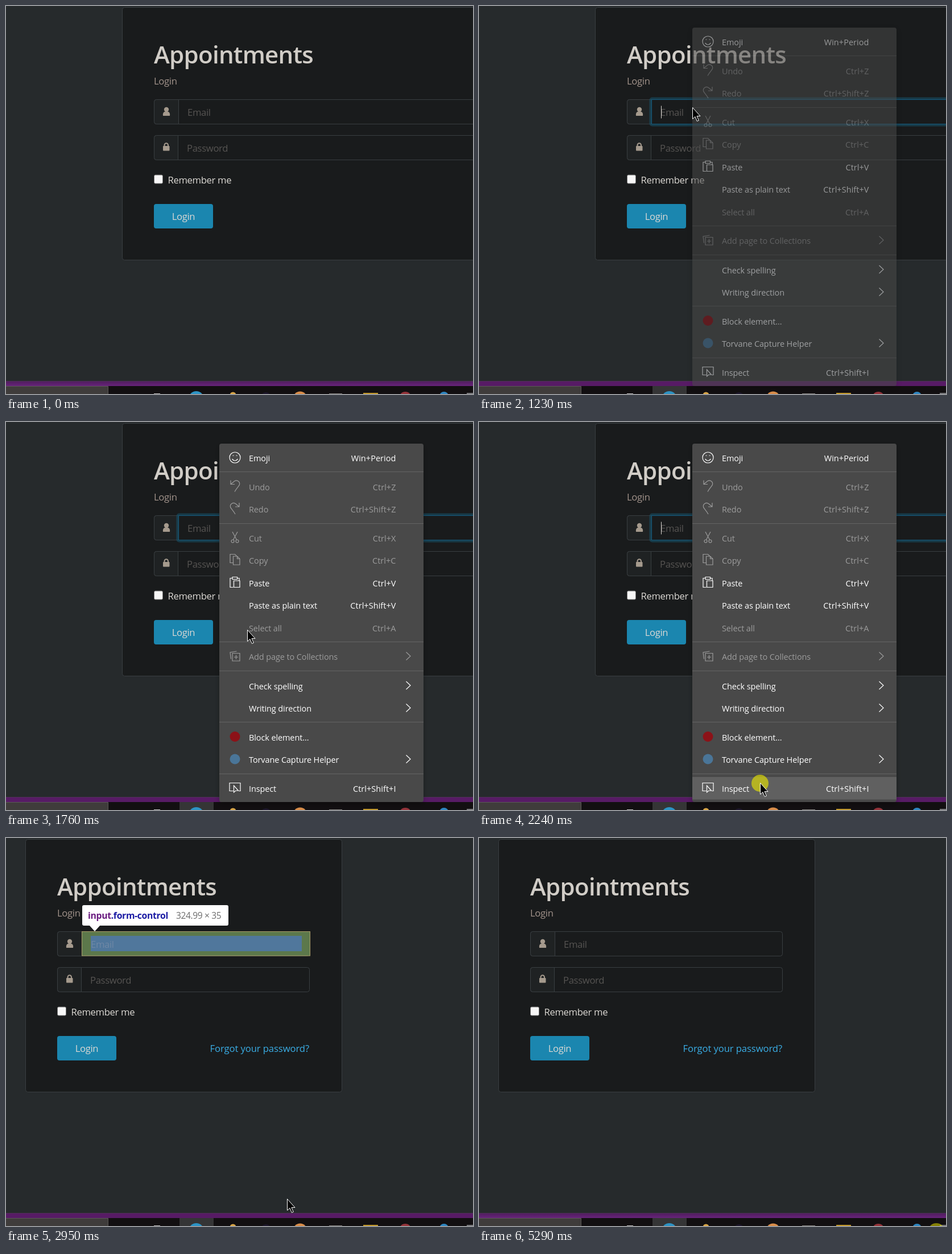
An HTML page that plays this animation: 821 by 682 pixels, repeating every 5360 ms.

```html
<!DOCTYPE html>
<html lang="en">
<head>
<meta charset="utf-8">
<title>Login form inspection</title>
<style>
  html, body { margin: 0; width: 100%; height: 100%; overflow: hidden; background: #262a2c; }
  svg { display: block; width: 821px; height: 682px; }
  text { font: 16.7px "Open Sans", "Noto Sans", sans-serif; letter-spacing: -.022em; fill: #dcd9d4; white-space: pre; }
  .title { font-size: 42px; font-weight: 600; letter-spacing: -.017em; fill: #d1cdc7; }
  .muted { fill: #a3948c; }
  .hint { fill: #565452; }
  .link { fill: #3aaee6; text-anchor: end; letter-spacing: -.007em; }
  .box { fill: #191b1c; stroke: #393e41; }
  .addon { fill: #1f2223; stroke: #393e41; }
  .glyph { fill: #a59a8d; }
  #menu text { font-size: 14.5px; letter-spacing: -.008em; fill: #fff; }
  #menu .off { fill: #9c9c9c; }
  #menu .key { text-anchor: end; letter-spacing: .003em; }
  .icon { fill: none; stroke: #fff; stroke-width: 1.2; }
  .icon.off { stroke: #9c9c9c; }
  #menu .icon.off { fill: none; }
  #tip text { font-size: 15.5px; fill: #6c6c6c; }
  #tip .name { font-size: 15.8px; font-weight: 700; fill: #1c1ca4; }
  #tip .tag { fill: #6a1b80; }
</style>
</head>
<body>
<svg viewBox="0 0 821 682">
  <defs>
    <linearGradient id="idle" x2="0" y2="1">
      <stop offset="0" stop-color="#4f1c5c"/><stop offset="1" stop-color="#66247a"/>
    </linearGradient>
    <filter id="shadow" x="-10%" y="-10%" width="120%" height="120%">
      <feDropShadow dx="0" dy="3" stdDeviation="5" flood-opacity=".28"/>
    </filter>
  </defs>
  <rect width="821" height="682" fill="#262a2c"/>

  <g id="form">
    <rect id="card" class="box" x=".5" y="2.5" height="444" rx="4"/>
    <text class="title" x="56" y="101">Appointments</text>
    <text class="muted" x="56" y="138">Login</text>
    <rect id="email" class="box" x="56.5" y="164.5" height="43" rx="4"/>
    <path class="addon" d="M99.5 164.5H60.5q-4 0-4 4v35q0 4 4 4H99.5z"/>
    <path class="glyph" d="M72 193q-1-7 4-7.5h4q5 .5 4 7.5z"/>
    <circle class="glyph" cx="78" cy="182" r="4.2"/>
    <g id="focus">
      <rect id="ring" x="97.5" y="162.5" height="47" rx="3" fill="none" stroke="#17546c" stroke-opacity=".55" stroke-width="4"/>
      <rect id="edge" x="99.5" y="164.5" height="43" fill="none" stroke="#145c80"/>
    </g>
    <text class="hint" x="115" y="193">Email</text>
    <path id="caret" d="M116.5 175.5v22" stroke="#d8d5d0"/>
    <rect id="password" class="box" x="56.5" y="227.5" height="43" rx="4"/>
    <path class="addon" d="M98.5 227.5H60.5q-4 0-4 4v35q0 4 4 4H98.5z"/>
    <rect class="glyph" x="72" y="246" width="11.5" height="8.5" rx="1"/>
    <path d="M74.5 247v-2.5a3.25 3.25 0 0 1 6.5 0v2.5" fill="none" stroke="#a59a8d" stroke-width="2"/>
    <text class="hint" x="114" y="256">Password</text>
    <rect x="56.5" y="297" width="15" height="15" rx="2" fill="#f7f7f7" stroke="#777"/>
    <text x="80.5" y="312">Remember me</text>
    <rect x="56" y="348" width="104" height="43" rx="4" fill="#1b86af"/>
    <text x="108" y="376" text-anchor="middle">Login</text>
    <text id="forgot" class="link" y="376">Forgot your password?</text>
  </g>

  <g id="tip">
    <rect x="133.5" y="164.5" width="401" height="42.5" fill="#5c784b" stroke="#a99f69"/>
    <rect x="149" y="172" width="371" height="27" fill="#50779c"/>
    <text x="149" y="193" style="font-size:16.7px;fill:#6f88a5">Email</text>
    <path d="M146 153h20l-10 11z" fill="#fff"/>
    <rect x="134" y="118" width="257" height="36" rx="3" fill="#fff"/>
    <text class="name" x="144" y="142"><tspan class="tag">input</tspan>.form-control</text>
    <text x="299" y="142">324.99 × 35</text>
  </g>

  <rect id="strip" y="659" width="821" height="9"/>
  <path d="M0 659.5H821" stroke="#4e3057"/>
  <rect y="668" width="821" height="14" fill="#120f11"/>
  <path d="M-1 668.5H179.5V683H-1z" fill="#3f3c3b" stroke="#5b5856"/>
  <rect id="task" x="305" y="668" width="60" height="14" fill="#353536"/>
  <g id="dock"></g>

  <g id="menu">
    <rect x="375" y="38" width="359" height="630" rx="4" fill="#4a4a4a" filter="url(#shadow)"/>
    <rect id="hover" x="375" width="359" height="39.5" fill="#606060"/>
    <path d="M375 87.5h359m-359 91h359m-359 208h359m-359 51h359m-359 90h359m-359 91h359" stroke="#646464"/>
    <g id="rows"></g>
  </g>

  <circle id="click" r="15" fill="#e8e400" fill-opacity=".63"/>
  <path id="arrow" d="M.5 .5V20.500L5 16.500l3.300 8 3-1.300-3.300-7.700H14z" fill="#000" stroke="#fff"/>
  <g id="beam" fill="none">
    <path d="M-4-10h3l1 1 1-1h3M-4 10h3l1-1 1 1h3M0-9V9" stroke="#000" stroke-width="3.5"/>
    <path d="M-4-10h3l1 1 1-1h3M-4 10h3l1-1 1 1h3M0-9V9" stroke="#fff" stroke-width="1.6"/>
  </g>
</svg>
<script>
const LOOP = 5360;
const el = Object.fromEntries([...document.querySelectorAll('[id]')].map(n => [n.id, n]));

// Icon paths are drawn around the middle of their row.
const icons = {
  emoji: 'M9.5 0a9.5 9.5 0 1 1-19 0a9.5 9.5 0 1 1 19 0M-5 2.5q5 6 10 0M-4-3.5h2m4 0h2',
  undo: 'M-7.5-10.5v7h7M-7.5-3.5L-1-9C4-12 9-8 8-3C7 0 3 3-.5 9.5',
  redo: 'M7.5-10.5v7h-7M7.5-3.5L1-9C-4-12-9-8-8-3C-7 0-3 3 .5 9.5',
  cut: 'M-4.5-10L3 4M4.5-10L-3 4M-1.5 6.5a2.5 2.5 0 1 1-5 0a2.5 2.5 0 1 1 5 0M6.5 6.5a2.5 2.5 0 1 1-5 0a2.5 2.5 0 1 1 5 0',
  copy: 'M-3 5h-5.5v-15H0l3 3M-3-6.5H4l4.5 4.5V8.5H-3zM4-6.5v4.5h4.5',
  paste: 'M-3 8.5h-5.5v-16h4M4-7.5h3.5v4M-4.5-9.5h8.5v4h-8.5zM-2-3H8.5V8.5H-2z',
  collect: 'M-4.5-5H8.5V8.5H-4.5zM2-2v7.5M-1.5 1.75h7M-7 5L-8.5-6.5L3-8.5',
  inspect: 'M-3 5.5h-6.5v-14h19v14H7M-2-4L-2 8l3.5-3h4.5z'
};

// label, row middle, shortcut ('>' for a submenu), icon or dot colour, disabled
const rows = [
  ['Emoji', 63.5, 'Win+Period', 'emoji'],
  ['Undo', 114, 'Ctrl+Z', 'undo', 1],
  ['Redo', 153.5, 'Ctrl+Shift+Z', 'redo', 1],
  ['Cut', 204, 'Ctrl+X', 'cut', 1],
  ['Copy', 243.5, 'Ctrl+C', 'copy', 1],
  ['Paste', 283, 'Ctrl+V', 'paste'],
  ['Paste as plain text', 322.5, 'Ctrl+Shift+V'],
  ['Select all', 362.5, 'Ctrl+A', '', 1],
  ['Add page to Collections', 412.5, '>', 'collect', 1],
  ['Check spelling', 464, '>'],
  ['Writing direction', 503.5, '>'],
  ['Block element...', 554, '', '#8c1218'],
  ['Torvane Capture Helper', 593.5, '>', '#4a7598'],
  ['Inspect', 644, 'Ctrl+Shift+I', 'inspect']
];

el.rows.innerHTML = rows.map(([label, y, key, icon, off]) => {
  const state = off ? 'off' : '';
  const mark = !icon ? '' : icon[0] === '#'
    ? `<circle cx="402.5" cy="${y - 1}" r="9" fill="${icon}"/>`
    : `<path class="icon ${state}" transform="translate(402.5 ${y - 1})" d="${icons[icon]}"/>`;
  const end = key === '>'
    ? `<path class="icon ${state}" d="M703.5 ${y - 8}l7.5 7-7.5 7"/>`
    : `<text class="key ${state}" x="685.5" y="${y + 5.5}">${key}</text>`;
  return `${mark}<text class="${state}" x="427" y="${y + 5.5}">${label}</text>${end}`;
}).join('');

const disc = (x, y, r, fill) => `<circle cx="${x}" cy="${y}" r="${r}" fill="${fill}"/>`;
const slab = (x, y, w, fill) => `<rect x="${x}" y="${y}" width="${w}" height="9" fill="${fill}"/>`;
el.dock.innerHTML = slab(260, 681, 11, '#c9c9c9') + disc(334.5, 690.5, 13.5, '#2d93c4') +
  disc(399, 684, 5.5, '#d9a648') + disc(457, 689, 10, '#1d172b') + disc(517, 690, 12.5, '#d98d4a') +
  slab(568, 681, 23, '#8c8a88') + slab(628, 680, 26, '#c49a2c') + disc(702, 689, 11, '#94333a') +
  disc(770, 686, 8, '#2f86c1') + slab(810, 680, 11, '#77777a');

// Each track is a list of [start time, ...values], held until the next entry.
const pointer = [
  [0, 'none'],
  [150, 'arrow', 781, 657], [230, 'arrow', 655, 575], [310, 'arrow', 530, 475],
  [380, 'arrow', 431, 382], [460, 'arrow', 388, 292], [530, 'beam', 374, 200],
  [610, 'beam', 371, 174.5], [690, 'beam', 371, 168], [840, 'beam', 373, 175],
  [920, 'beam', 375.5, 180.5], [1070, 'arrow', 375, 178],
  [1610, 'arrow', 379, 196], [1690, 'arrow', 396, 262], [1760, 'arrow', 424, 365],
  [1840, 'arrow', 452, 470], [1920, 'arrow', 476, 560], [1990, 'arrow', 489, 614],
  [2070, 'arrow', 494, 634], [4740, 'arrow', 534, 634], [4810, 'arrow', 690, 652],
  [4890, 'none']
];
const menuFade = [[0, 0], [1150, .25], [1220, .55], [1300, .8], [1380, 1], [2310, 0]];
const focusFade = [[0, 0], [1070, .25], [1150, .75], [1220, 1], [2560, .75], [2630, .25], [2710, 0]];
const caretOn = [[0, 0], [1070, 1], [1610, 0], [2070, 1], [2560, 0]];
const clicks = [[0, 0], [2240, 1, 494, 635], [2310, 0], [5290, .85, 804, 692]];
const layout = [[0, 204, 900], [2560, 34, 556]];

const at = (track, t) => track.findLast(step => step[0] <= t).slice(1);
const show = (node, on) => node.setAttribute('opacity', +on);
const place = (node, x, y) => node.setAttribute('transform', `translate(${x} ${y})`);

function draw(t) {
  const [left, width] = at(layout, t);
  place(el.form, left, 0);
  el.card.setAttribute('width', width);
  el.email.setAttribute('width', width - 113);
  el.password.setAttribute('width', width - 113);
  el.ring.setAttribute('width', width - 152);
  el.edge.setAttribute('width', width - 156);
  el.forgot.setAttribute('x', width - 57);

  show(el.focus, at(focusFade, t)[0]);
  show(el.caret, at(caretOn, t)[0]);
  show(el.menu, at(menuFade, t)[0]);
  show(el.tip, t >= 2950 && t < 4740);
  show(el.task, t >= 1070);
  el.strip.setAttribute('fill', t >= 1070 && t < 5210 ? '#571b65' : 'url(#idle)');

  const [kind, x = 0, y = 0] = at(pointer, t);
  for (const name of ['arrow', 'beam']) {
    show(el[name], kind === name);
    place(el[name], x, y);
  }
  const row = t >= 1610 && rows.find(r => !r[4] && Math.abs(r[1] - y) < 19.8);
  show(el.hover, !!row);
  if (row) el.hover.setAttribute('y', row[1] - 20);

  const [strength, cx = 0, cy = 0] = at(clicks, t);
  show(el.click, strength);
  place(el.click, cx, cy);
}

function tick() {
  draw(performance.now() % LOOP);
  requestAnimationFrame(tick);
}
tick();
</script>
</body>
</html>
```
